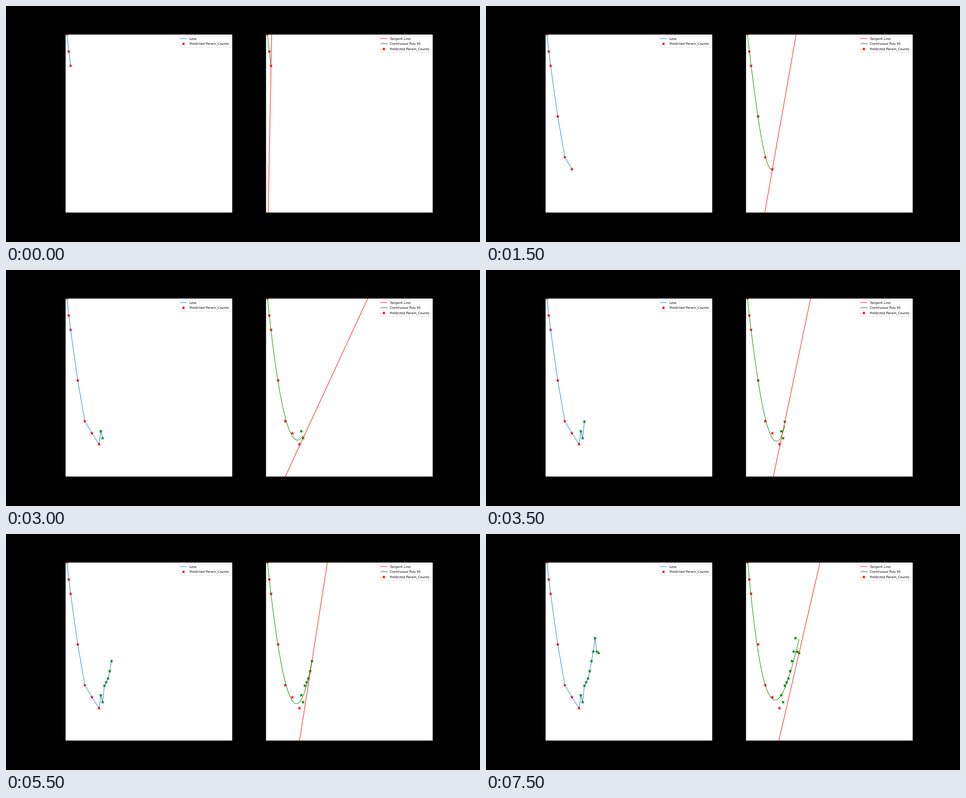
Recreate the animation shown at these times as an HTML page. Size 1058 px wide and 529 px high, loop 8 s.

```html
<!DOCTYPE html>
<html lang="en">
<head>
<meta charset="utf-8">
<title>Loss and polynomial fit</title>
<style>
  html, body { margin: 0; width: 100%; height: 100%; overflow: hidden; background: #000; }
  svg { display: block; width: 1058px; height: 529px; }
  text { font: 7.25px "DejaVu Sans", sans-serif; fill: #000; }
  .line { fill: none; stroke-width: 1.35; stroke-opacity: .8; stroke-linejoin: round; }
</style>
</head>
<body>
<svg id="stage" viewBox="0 0 1058 529"></svg>
<script>
const STEP = 500, STEPS = 16, FIRST_COUNT = 3, RED_COUNT = 7;
const PLOT = { top: 64, width: 372, height: 399 };
const LEFT = 133, RIGHT = 580.4;
const BLUE = '#1f77b4', RED = '#ff0000', GREEN = '#008000';

const counts = [1, 2, 3, 7, 11, 15, 19, 20, 21, 22, 23, 24, 25, 26, 27, 28, 29, 30];
const heights = [63.5, 102, 134, 247.5, 339, 366, 390.5, 361.5, 377,
  340, 332.5, 324, 307.5, 285, 263.5, 233.5, 264, 267];
// Rise of the tangent in pixels per pixel, one for each step.
const slopes = [52, 17, 9, 5.7, 0.7, 2.9, 2.17, 4.8, 5.2, 5.58, 6, 6.43, 7, 7.62, 5.8, 4.35];

const plotX = (left, n) => left - 0.7 + 3.97 * n;
const polyline = pts => 'M' + pts.map(p => p.map(v => v.toFixed(2)).join(' ')).join('L');
const line = (d, color) => `<path class="line" d="${d}" stroke="${color}"/>`;

function star(x, y, color) {
  const pts = Array.from({ length: 10 }, (_, i) => {
    const r = i % 2 ? 1.75 : 4.5, a = i * Math.PI / 5;
    return [x + r * Math.sin(a), y - r * Math.cos(a)];
  });
  return `<path d="${polyline(pts)}Z" fill="${color}"/>`;
}

// Least squares polynomial through the first `count` points.
function fitPolynomial(count, degree) {
  const size = degree + 1, scale = n => (n - 15) / 15;
  const rows = Array.from({ length: size }, () => Array(size + 1).fill(0));
  for (let k = 0; k < count; k++) {
    const t = scale(counts[k]);
    rows.forEach((row, i) => {
      for (let j = 0; j < size; j++) row[j] += t ** (i + j);
      row[size] += heights[k] * t ** i;
    });
  }
  for (let i = 0; i < size; i++) {
    const pivot = rows[i][i];
    rows[i] = rows[i].map(v => v / pivot);
    for (let r = 0; r < size; r++) {
      if (r === i) continue;
      const factor = rows[r][i];
      rows[r] = rows[r].map((v, j) => v - factor * rows[i][j]);
    }
  }
  return n => rows.reduce((sum, row, i) => sum + row[size] * scale(n) ** i, 0);
}

function fitCurve(count) {
  const fit = fitPolynomial(count, Math.min(3, count - 1));
  const last = counts[count - 1];
  return polyline(Array.from({ length: 101 }, (_, i) => {
    const n = 1 + (last - 1) * i / 100;
    return [plotX(RIGHT, n), fit(n)];
  }));
}

function tangent(step, count) {
  const x = plotX(RIGHT, counts[count - 1]), y = heights[count - 1];
  const at = h => [x + (y - h) / slopes[step], h];
  return polyline([at(470), at(57)]);
}

const points = (left, count) =>
  counts.slice(0, count).map((n, i) => [plotX(left, n), heights[i]]);
const stars = pts =>
  pts.map(([x, y], i) => star(x, y, i < RED_COUNT ? RED : GREEN)).join('');

function legend(x, entries) {
  const rows = entries.map(([label, color, isStar], i) => {
    const y = 73 + 11.6 * i;
    const mark = isStar ? star(x + 10.3, y + .3, color)
      : line(`M${x + 3} ${y}h15`, color);
    return `${mark}<text x="${x + 23.6}" y="${y + 2.6}">${label}</text>`;
  });
  return `<rect x="${x}" y="67.4" width="116" height="${1.9 + 11.6 * entries.length}" rx="1.5"
    fill="#fff" fill-opacity=".8" stroke="#ccc" stroke-opacity=".8" stroke-width=".75"/>` + rows.join('');
}

const panel = (id, left, entries) => `
  <clipPath id="${id}Clip"><rect x="${left}" y="${PLOT.top}" width="${PLOT.width}" height="${PLOT.height}"/></clipPath>
  <rect x="${left}" y="${PLOT.top}" width="${PLOT.width}" height="${PLOT.height}" fill="#fff"/>
  <g id="${id}" clip-path="url(#${id}Clip)"></g>
  ${legend(left + 252.8, entries)}`;

const starEntry = ['Predicted Param_Counts', RED, true];
document.getElementById('stage').innerHTML =
  '<rect width="1058" height="529"/>' +
  panel('loss', LEFT, [['Loss', BLUE], starEntry]) +
  panel('fit', RIGHT, [['Tangent Line', RED], ['Continuous Poly Fit', GREEN], starEntry]);

const lossGroup = document.getElementById('loss');
const fitGroup = document.getElementById('fit');
let shown = -1;

function draw(step) {
  const count = FIRST_COUNT + step;
  const lossPoints = points(LEFT, count);
  lossGroup.innerHTML = stars(lossPoints) + line(polyline(lossPoints), BLUE);
  fitGroup.innerHTML = stars(points(RIGHT, count)) +
    line(tangent(step, count), RED) + line(fitCurve(count), GREEN);
}

const start = performance.now();
function tick() {
  const step = Math.floor((performance.now() - start) / STEP) % STEPS;
  if (step !== shown) draw(shown = step);
  requestAnimationFrame(tick);
}
tick();
</script>
</body>
</html>
```
